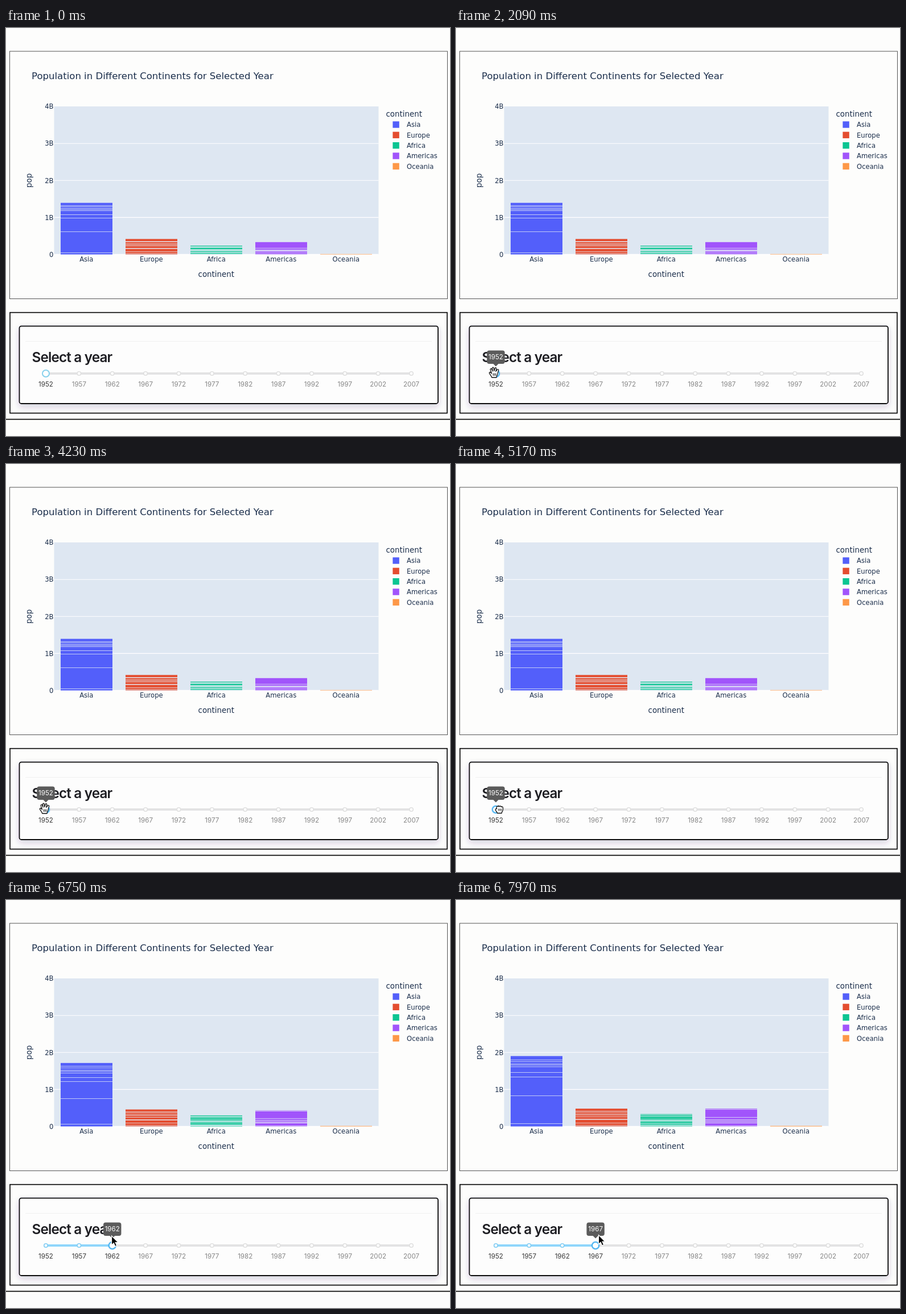
An HTML page that plays this animation: 780x718 px, repeating every 7990 ms.

```html
<!DOCTYPE html>
<html lang="en">
<head>
<meta charset="utf-8">
<title>Population by continent</title>
<style>
html, body { margin: 0; width: 100%; height: 100%; overflow: hidden; background: #fdfdfc; }
svg { display: block; }
#chart text { font: 11.6px "DejaVu Sans", sans-serif; fill: #1c2f4c; }
#chart .title { font-size: 16.54px; }
#chart .axis { font-size: 13.4px; }
#panel text { font: 11.6px Inter, sans-serif; text-anchor: middle; }
#panel .heading { font-size: 24.3px; font-weight: 600; letter-spacing: -.035em; text-anchor: start; fill: #1d1d22; }
</style>
</head>
<body>
<svg width="780" height="718" viewBox="0 0 780 718">
  <defs>
    <filter id="shadow" x="-10%" y="-30%" width="120%" height="160%">
      <feDropShadow dx="0" dy="5" stdDeviation="6" flood-color="#30206a" flood-opacity=".2"/>
    </filter>
    <g id="arrow" stroke="#fff" stroke-width="1.2">
      <path d="M0 0V16.2L3.7 12.8L6.2 18.6L9.1 17.4L6.6 11.7H11.6Z"/>
    </g>
    <g id="open" fill="#fff" stroke="#111" stroke-width="1.3" stroke-linejoin="round" stroke-linecap="round">
      <path d="M-4 9C-5 6-7 4-8.3 1.6C-9 0-7-1-5.6.6L-4.3 2L-6.6-4.6C-7-6.6-4.8-7.2-4-5.4L-2.7-2L-3.2-7.2C-3.2-9.3-.8-9.3-.5-7.4L0-2.4L1.5-7.2C2.2-9 4.3-8.3 4-6.4L3-1.6L5.6-4.8C7-6.2 8.5-4.8 7.7-3.2C6.2 0 6.6 4 4.7 6.4L4.2 9Z"/>
      <path d="M-1.5 2V5.6M.8 2V5.6M3 2V5.6" stroke-width="1"/>
    </g>
    <g id="closed" fill="#fff" stroke="#111" stroke-width="1.3" stroke-linejoin="round" stroke-linecap="round">
      <path d="M-3.5 7.5C-4 5-7 3.5-6.8 1C-6.7-.6-5-.8-4.5 0L-5-2.8C-5-5-2.4-5.4-2-3.8C-1.8-6-.9-6 .6-4C1-5.8 3.2-5.4 3.4-3.3C4.5-4.6 6.4-4 6.4-2C6.5 1 6 4 4.6 5.5L4.2 7.5Z"/>
      <path d="M-1.3 0V3M1 0V3M3.3 0V3" stroke-width="1"/>
    </g>
  </defs>

  <g id="chart">
    <rect x="6.5" y="41" width="769" height="435.5" fill="none" stroke="#555"/>
    <rect x="84.5" y="138" width="570" height="260.5" fill="#dee7f2"/>
    <g id="axes"></g>
    <g id="bars"></g>
    <text class="title" x="45" y="90">Population in Different Continents for Selected Year</text>
    <text class="axis" x="369.3" y="437.5" text-anchor="middle">continent</text>
    <text class="axis" transform="translate(44.5 268.3) rotate(-90)" text-anchor="middle">pop</text>
    <text class="axis" x="667.5" y="156">continent</text>
  </g>

  <g id="panel">
    <rect x="7" y="500.7" width="768" height="177" fill="none" stroke="#0c0c0c" stroke-width="1.7"/>
    <rect x="23.5" y="524.7" width="735.5" height="136.3" rx="3.5" fill="#fdfdfd" stroke="#0c0c0c" stroke-width="1.8" filter="url(#shadow)"/>
    <path d="M34 551.5H748" stroke="#f1f1f1"/>
    <path d="M0 688.6H780" stroke="#0c0c0c" stroke-width="1.8"/>
    <text class="heading" x="45.5" y="588">Select a year</text>
    <g id="slider"></g>
  </g>
  <use id="cursor"/>
</svg>

<script>
const $ = id => document.getElementById(id);
const LOOP = 7990, CHART_DELAY = 90, BASE = 398.5, BILLION = 65.1;

// Population in billions at the first year, its growth per step,
// and the shares of the stack at which the clearest seams lie.
const continents = [
  { name: 'Asia', color: '#535ffa', start: 1.395, growth: 1.109,
    seams: [.043, .442, .708, .775, .848, .872, .892, .925, .95] },
  { name: 'Europe', color: '#e44d30', start: .418, growth: 1.048,
    seams: [.03, .09, .217, .39, .425, .56, .65, .72, .81, .88] },
  { name: 'Africa', color: '#0cc592', start: .238, growth: 1.122,
    seams: [.06, .12, .2, .31, .42, .48, .54, .63, .8, .88, .96] },
  { name: 'Americas', color: '#a154fb', start: .345, growth: 1.117,
    seams: [.06, .22, .28, .35, .4, .53, .98] },
  { name: 'Oceania', color: '#fd9848', start: .0107, growth: 1.11, seams: [] }
];

function drawAxes() {
  let out = '';
  for (let b = 0; b <= 4; b++) {
    const y = BASE - BILLION * b;
    if (b < 4) out += `<path d="M84.5 ${y}H654.5" stroke="#fff" stroke-width="${b ? 1.1 : 1.6}"/>`;
    out += `<text x="83.5" y="${y + 4.2}" text-anchor="end">${b ? b + 'B' : 0}</text>`;
  }
  continents.forEach(({ name, color }, i) => {
    const y = 170 + 18.35 * i;
    out += `<text x="${141.3 + 114 * i}" y="411" text-anchor="middle">${name}</text>
      <rect x="679.4" y="${y - 5.7}" width="11.4" height="11.4" fill="${color}"/>
      <text x="704" y="${y + 4.2}">${name}</text>`;
  });
  $('axes').innerHTML = out;
}

function drawBars(period) {
  $('bars').innerHTML = continents.map(({ color, start, growth, seams }, i) => {
    const x = 96 + 114 * i, height = BILLION * start * growth ** period;
    const lines = seams.map(s => `M${x} ${Math.round(BASE - s * height) + .5}h91`).join('');
    return `<rect x="${x}" y="${BASE - height}" width="91" height="${height}" fill="${color}"/>
      <path d="${lines}" stroke="#e5ecf6" stroke-opacity=".75"/>`;
  }).join('');
}

const STEP = 58.37, tickX = i => 70 + STEP * i;

function drawSlider(period, touched) {
  const x = tickX(period);
  let out = `<path d="M70 608H712" stroke="#e3e3e4" stroke-width="3.8"/>
    <path d="M70 608H${x}" stroke="#8fd6fb" stroke-width="3.8"/>`;
  for (let i = 0; i < 12; i++) {
    const on = i <= period;
    out += `<circle cx="${tickX(i)}" cy="608" r="3.2" fill="#fff" stroke="${on ? '#83cdf3' : '#e0e0e0'}" stroke-width="1.6"/>
      <text x="${tickX(i)}" y="631.3" fill="${on ? '#383838' : '#868686'}">${1952 + 5 * i}</text>`;
  }
  if (touched) out += `<circle cx="${x}" cy="608" r="8.2" fill="#1890ff" opacity=".14"/>`;
  out += `<circle cx="${x}" cy="608" r="6" fill="#fff" stroke="${touched ? '#48b2ef' : '#86d0ec'}" stroke-width="2"/>`;
  if (touched) out += `<g fill="#5b5b5b"><rect x="${x - 15.7}" y="567.5" width="31.4" height="23.5" rx="4"/>
    <path d="M${x - 5} 590.5h10l-5 5Z"/></g>
    <text x="${x}" y="583.3" fill="#fff">${1952 + 5 * period}</text>`;
  $('slider').innerHTML = out;
}

// Pointer path: [time, x, y]
const ENTER = 1000, GRAB = 4300;
const path = [[0, 66, 606], [4700, 68, 606], [5170, 76, 607],
  [6050, 153.5, 596], [6750, 185.5, 591], [LOOP, 251.5, 589.5]];

function pointer(t) {
  const k = path.findIndex(p => p[0] > t);
  const [a, b] = [path[k - 1], path[k]], f = (t - a[0]) / (b[0] - a[0]);
  return [a[1] + (b[1] - a[1]) * f, a[2] + (b[2] - a[2]) * f];
}

const periodAt = t => Math.max(0, Math.round((pointer(Math.max(0, t))[0] - 70) / STEP));

let shownBars, shownSlider;
function render(t) {
  const touched = t >= ENTER, period = periodAt(t), bars = periodAt(t - CHART_DELAY);
  if (bars !== shownBars) drawBars(shownBars = bars);
  const key = period + '/' + touched;
  if (key !== shownSlider) drawSlider(period, touched), shownSlider = key;

  const [x, y] = pointer(t), cursor = $('cursor');
  cursor.setAttribute('href', x > 82 ? '#arrow' : t < GRAB ? '#open' : '#closed');
  cursor.setAttribute('transform', `translate(${x} ${y})`);
  cursor.setAttribute('visibility', touched ? 'visible' : 'hidden');
}

drawAxes();
const start = performance.now();
(function tick() {
  render(Math.max(0, performance.now() - start) % LOOP);
  requestAnimationFrame(tick);
})();
</script>
</body>
</html>
```
